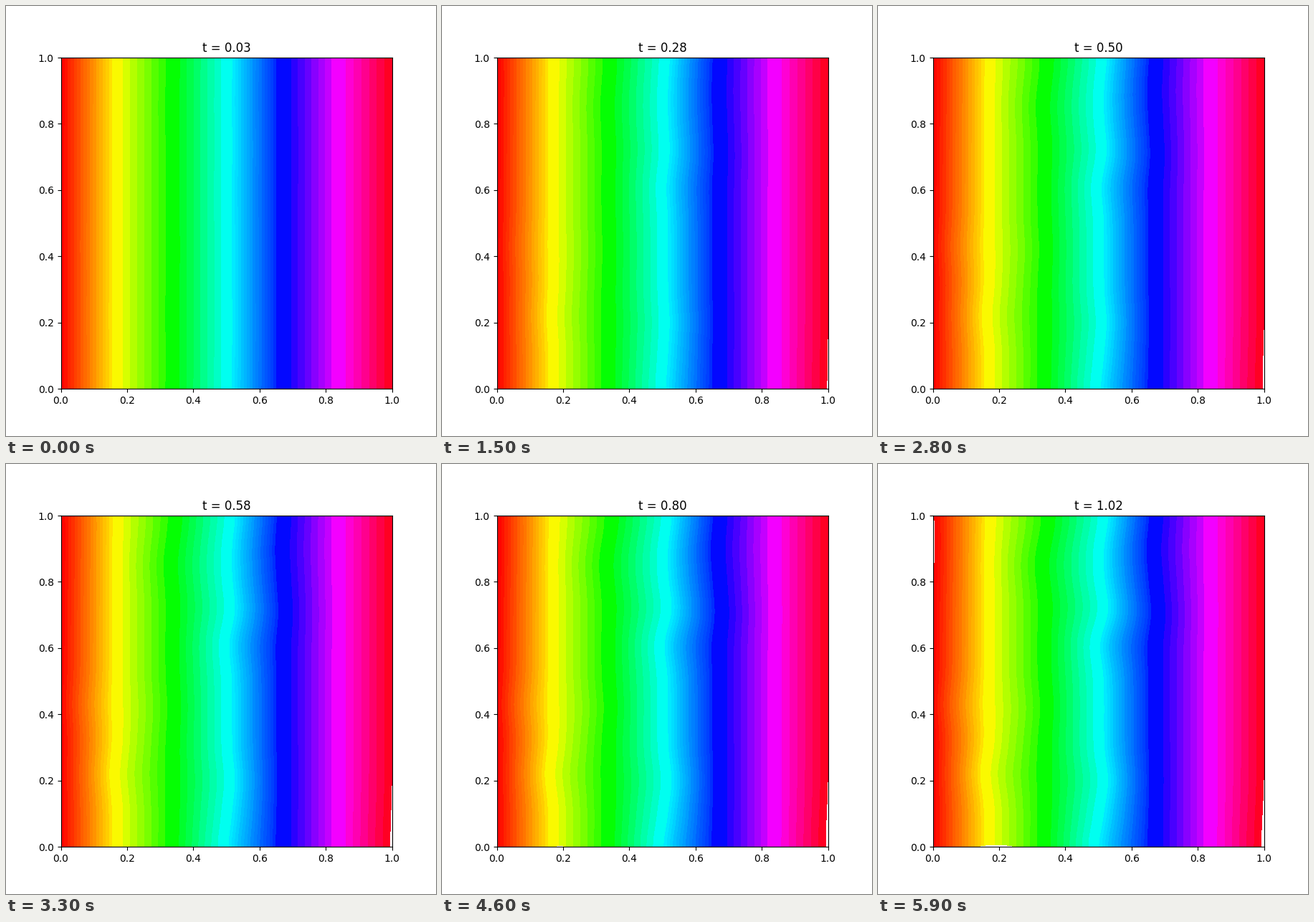
These frames come from a looping animation (600x600 px, 6 s). A matplotlib script:

```python
import numpy as np
import matplotlib.pyplot as plt
from matplotlib.animation import FuncAnimation

FRAMES, INTERVAL = 60, 100
SIZE = 462          # side of the square plot in pixels

# Stretches of the hue scale, each split evenly into some colour bands.
STOPS = [0, 0.154, 0.187, 0.315, 0.358, 0.483, 0.516, 0.65, 0.695,
         0.817, 0.86, 1]
BANDS = [16, 1, 6, 1, 6, 1, 15, 1, 6, 1, 6]

# Places where the flow pushes sideways: x, y, final push in pixels, reach in y.
PUSHES = [
    (0.50, 1.00, 6, 0.07), (0.50, 0.72, 6, 0.07), (0.52, 0.61, -6, 0.07),
    (0.50, 0.20, 6, 0.07), (0.50, 0.00, -7, 0.07), (0.32, 0.99, 4, 0.07),
    (0.31, 0.85, -4, 0.07), (0.29, 0.42, 4, 0.07), (0.18, 0.22, -6, 0.07),
    (0.08, 0.43, -4, 0.07), (0.67, 0.70, 3, 0.07), (0.67, 0.90, -3, 0.07),
    (1.00, 0.00, -4, 0.14), (0.00, 0.92, 1.7, 0.18),
]
REACH_X = 0.12


def bell(v, center, reach):
    return np.exp(-((v - center) / reach) ** 2)


edges = np.concatenate(
    [np.linspace(lo, hi, n, endpoint=False)
     for lo, hi, n in zip(STOPS, STOPS[1:], BANDS)] + [[1]])
colors = plt.cm.hsv((edges[:-1] + edges[1:]) / 2)[:, :3]

x = (np.arange(SIZE) + 0.5) / SIZE
y = 1 - x[:, None]
drift = sum(push * bell(x, px, REACH_X) * bell(y, py, reach)
            for px, py, push, reach in PUSHES) / SIZE


def time_at(n):
    return (n + 2) / 60


def growth(n):
    """Share of the final drift, slowing down gently."""
    return np.expm1(-time_at(n)) / np.expm1(-time_at(FRAMES - 1))


def picture(n):
    g = growth(n)
    start = x - drift * g
    band = np.searchsorted(edges, start, side="right") - 1
    rgb = colors[np.clip(band, 0, len(colors) - 1)]
    lift = 14 * g * bell(x, 0.19, 0.12) - 11.5
    rgb[(start < 0) | (start > 1) | (y * SIZE < lift)] = 1
    return rgb


fig, ax = plt.subplots(figsize=(6, 6), dpi=100)
image = ax.imshow(picture(0), extent=(0, 1, 0, 1), interpolation="nearest")
title = ax.set_title("")


def update(n):
    image.set_data(picture(n))
    title.set_text(f"t = {time_at(n):.2f}")
    return image, title


anim = FuncAnimation(fig, update, frames=FRAMES, interval=INTERVAL,
                     repeat=True, repeat_delay=0)
plt.show()
```
